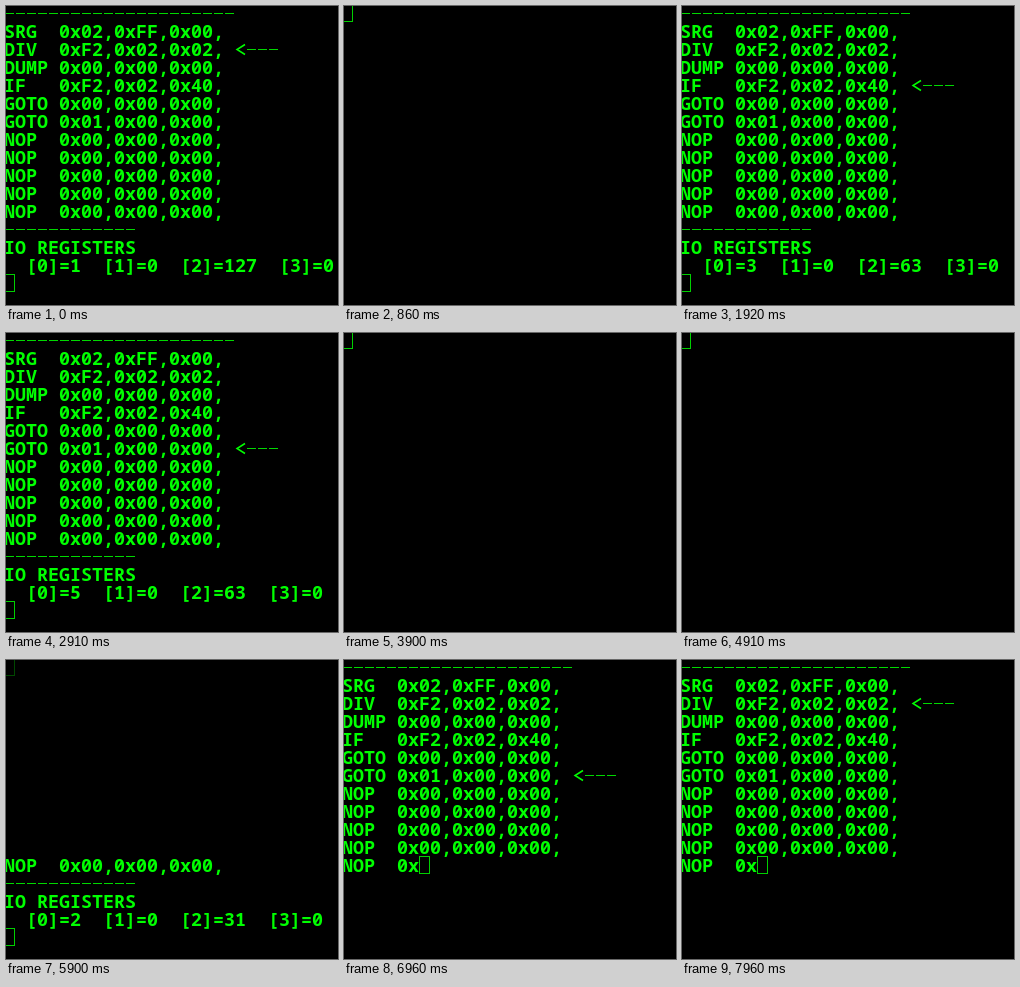
Animation of 332 by 299 pixels, one loop 8000 ms. Source, as an HTML page with a canvas:

```html
<!DOCTYPE html>
<html lang="en">
<head>
<meta charset="utf-8">
<title>Register machine</title>
<style>
  html, body { margin: 0; width: 100%; height: 100%; overflow: hidden; background: #000; }
  canvas { display: block; }
</style>
</head>
<body>
<canvas id="screen" width="332" height="299"></canvas>
<script>
const ctx = document.getElementById('screen').getContext('2d');
const LOOP = 8000;
const CELL_W = 11, CELL_H = 18, ORIGIN = -2;
const GREEN = '#00ff00';

const program = [
  'SRG  0x02,0xFF,0x00,',
  'DIV  0xF2,0x02,0x02,',
  'DUMP 0x00,0x00,0x00,',
  'IF   0xF2,0x02,0x40,',
  'GOTO 0x00,0x00,0x00,',
  'GOTO 0x01,0x00,0x00,',
  ...Array(5).fill('NOP  0x00,0x00,0x00,')
];

// Start time, part of the screen drawn, program counter, value of register 2
const timeline = [
  [0, 'full', 1, 127],
  [860, 'clear'],
  [930, 'full', 2, 63],
  [1920, 'full', 3, 63],
  [2910, 'full', 5, 63],
  [3900, 'clear'],
  [3970, 'full', 1, 63],
  [4910, 'clear'],
  [4970, 'full', 2, 31],
  [5900, 'tail', 2, 31],
  [5970, 'full', 3, 31],
  [6960, 'head', 5, 31],
  [7030, 'full', 5, 31],
  [7960, 'head', 1, 31]
];

const cellX = col => ORIGIN + col * CELL_W;
const cellY = row => ORIGIN + row * CELL_H;

function print(row, text) {
  ctx.fillStyle = GREEN;
  ctx.fillText(text, cellX(0), cellY(row) + 16);
}

function dashes(row, col, count) {
  ctx.fillStyle = '#00d800';
  for (let i = 0; i < count; i++) {
    ctx.fillRect(cellX(col + i) + 1, cellY(row) + 9, CELL_W - 2, 1);
  }
}

function arrow(row) {
  const x = cellX(21), y = cellY(row);
  ctx.strokeStyle = GREEN;
  ctx.lineWidth = 1.5;
  ctx.beginPath();
  ctx.moveTo(x + 10, y + 4.5);
  ctx.lineTo(x + 2, y + 9.5);
  ctx.lineTo(x + 10, y + 14.5);
  ctx.stroke();
  dashes(row, 22, 3);
}

function cursor(row, col, color = '#00d000') {
  ctx.strokeStyle = color;
  ctx.lineWidth = 1;
  ctx.strokeRect(cellX(col) + 0.5, cellY(row) + 0.5, CELL_W - 1, CELL_H - 1);
}

function drawHead(pc, lines) {
  dashes(0, 0, 21);
  lines.forEach((line, i) => print(i + 1, line));
  arrow(pc + 1);
}

function drawRegisters(pc, value) {
  dashes(12, 0, 12);
  print(13, 'IO REGISTERS');
  print(14, `  [0]=${pc}  [1]=0  [2]=${value}  [3]=0`);
  cursor(15, 0);
}

const views = {
  clear() {
    cursor(0, 0);
  },
  full(pc, value) {
    drawHead(pc, program);
    drawRegisters(pc, value);
  },
  head(pc) {
    drawHead(pc, [...program.slice(0, 10), 'NOP  0x']);
    cursor(11, 7);
  },
  tail(pc, value) {
    cursor(0, 0, '#004800');
    print(11, program[10]);
    drawRegisters(pc, value);
  }
};

function render(now) {
  const time = now % LOOP;
  const [, view, pc, value] = timeline.findLast(([start]) => start <= time) || timeline[0];
  ctx.fillStyle = '#000';
  ctx.fillRect(0, 0, 332, 299);
  ctx.font = 'bold 18.333px "Noto Sans Mono", "DejaVu Sans Mono", monospace';
  views[view](pc, value);
  requestAnimationFrame(() => render(performance.now()));
}

render(performance.now());
</script>
</body>
</html>
```
